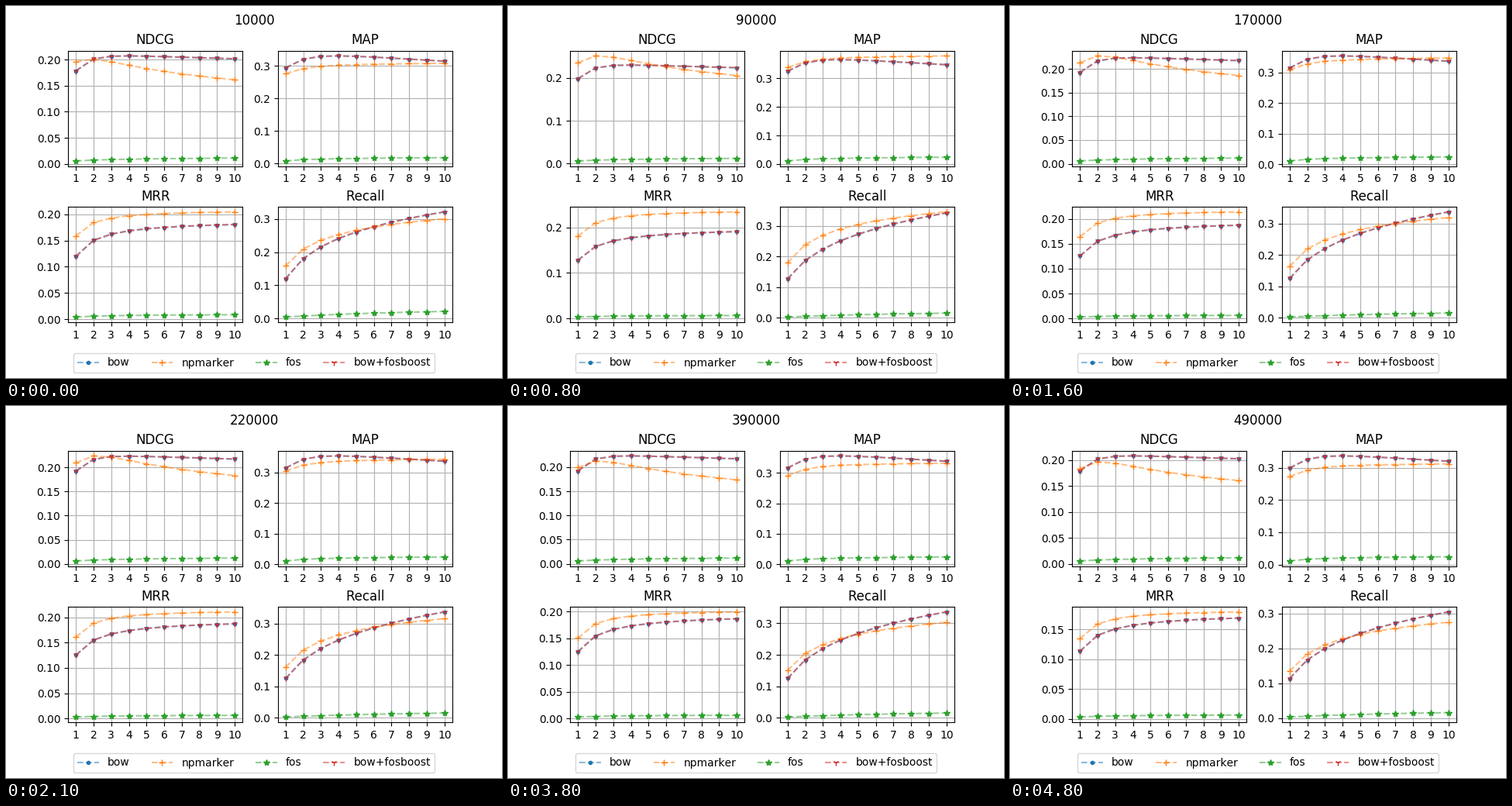
These frames come from a looping animation (640 by 480 pixels, 6300 ms). A matplotlib script:

```python
import numpy as np
import matplotlib.pyplot as plt
from matplotlib.animation import FuncAnimation

FRAMES, LAST = 63, 48
WARM_UP = 8
K = np.arange(1, 11)
LOG_K = np.log10(K)
SERIES = {"bow": ("C0", "."), "npmarker": ("C1", "+"),
          "fos": ("C2", "*"), "bow+fosboost": ("C3", "1")}

# Whole-pixel kerning for the labels.
plt.rcParams["text.kerning_factor"] = 6


def level(step, *points):
    """Score at k = 10: quick rise, settling, slow drift, final drop."""
    return np.interp(step, [0, WARM_UP, 16, 38, LAST], points)


def ranking(fall, dip, rate):
    """Curve ending near 1 that climbs out of a dip, then falls."""
    return 1 + fall - dip * np.exp(-rate * (K - 1))


def coverage(start, bend):
    """Curve from start to 1, nearly straight in log k."""
    return start + (1 - start) * LOG_K - bend * LOG_K * (1 - LOG_K)


def bow(panel, step, warm):
    fall = (10 - K) / 9
    if panel == "NDCG":
        return level(step, .2016, .2242, .2175, .2175, .2025) * ranking(.046 * fall, .16, 1.3)
    if panel == "MAP":
        return level(step, .314, .348, .337, .338, .320) * ranking(.092 * fall, .157, .93)
    return level(step, .3218, .343, .337, .336, .3045) * coverage(.373, .065 * (1 - warm))


def npmarker(panel, step, warm):
    fall = 1 - LOG_K
    if panel == "NDCG":
        return level(step, .1613, .206, .186, .174, .1606) * ranking(.45 * fall, .305 - .07 * warm, 1.2)
    if panel == "MAP":
        return level(step, .3075, .379, .3475, .3315, .3117) * ranking(-.04 * fall, .062 + .0005 * step, .95)
    return level(step, .301, .3463, .319, .303, .275) * coverage(.528 - .0008 * step, -.125)


def fos(panel, step, warm):
    if panel == "NDCG":
        return (.0059 + .006 * LOG_K) * (1 - .07 * warm)
    if panel == "MAP":
        return (.011 + .013 * LOG_K ** .75) * (1 - .23 * warm)
    return (.0031 + .0124 * LOG_K ** 1.5) * (1 + .35 * warm)


CURVES = {"bow": bow, "npmarker": npmarker, "fos": fos, "bow+fosboost": bow}


def scores(panel, name, step):
    if panel == "MRR":
        # Each newly found item counts by the inverse of its rank.
        return np.cumsum(np.diff(scores("Recall", name, step), prepend=0) / K)
    warm = max(0, 1 - step / WARM_UP)
    return CURVES[name](panel, step, warm)


fig, grid = plt.subplots(2, 2, figsize=(6.4, 4.8), dpi=100)
fig.subplots_adjust(bottom=0.15, hspace=0.35)
heading = fig.suptitle("")
panels = dict(zip(("NDCG", "MAP", "MRR", "Recall"), grid.flat))
lines = {}
for panel, ax in panels.items():
    ax.set_title(panel)
    ax.set_xticks(K)
    ax.grid(True)
    for name, (color, marker) in SERIES.items():
        lines[panel, name], = ax.plot(
            K, scores(panel, name, 0), "--", color=(color, 0.5), marker=marker,
            markerfacecolor=color, markeredgecolor=color, label=name)
fig.legend(*grid[0, 0].get_legend_handles_labels(), loc="lower center", ncol=4)


def update(frame):
    step = min(frame, LAST)
    heading.set_text(str((step + 1) * 10000))
    for (panel, name), line in lines.items():
        line.set_ydata(scores(panel, name, step))
    for ax in panels.values():
        ax.relim()
        ax.autoscale_view()


anim = FuncAnimation(fig, update, frames=FRAMES, interval=100, repeat=True)
plt.show()
```
